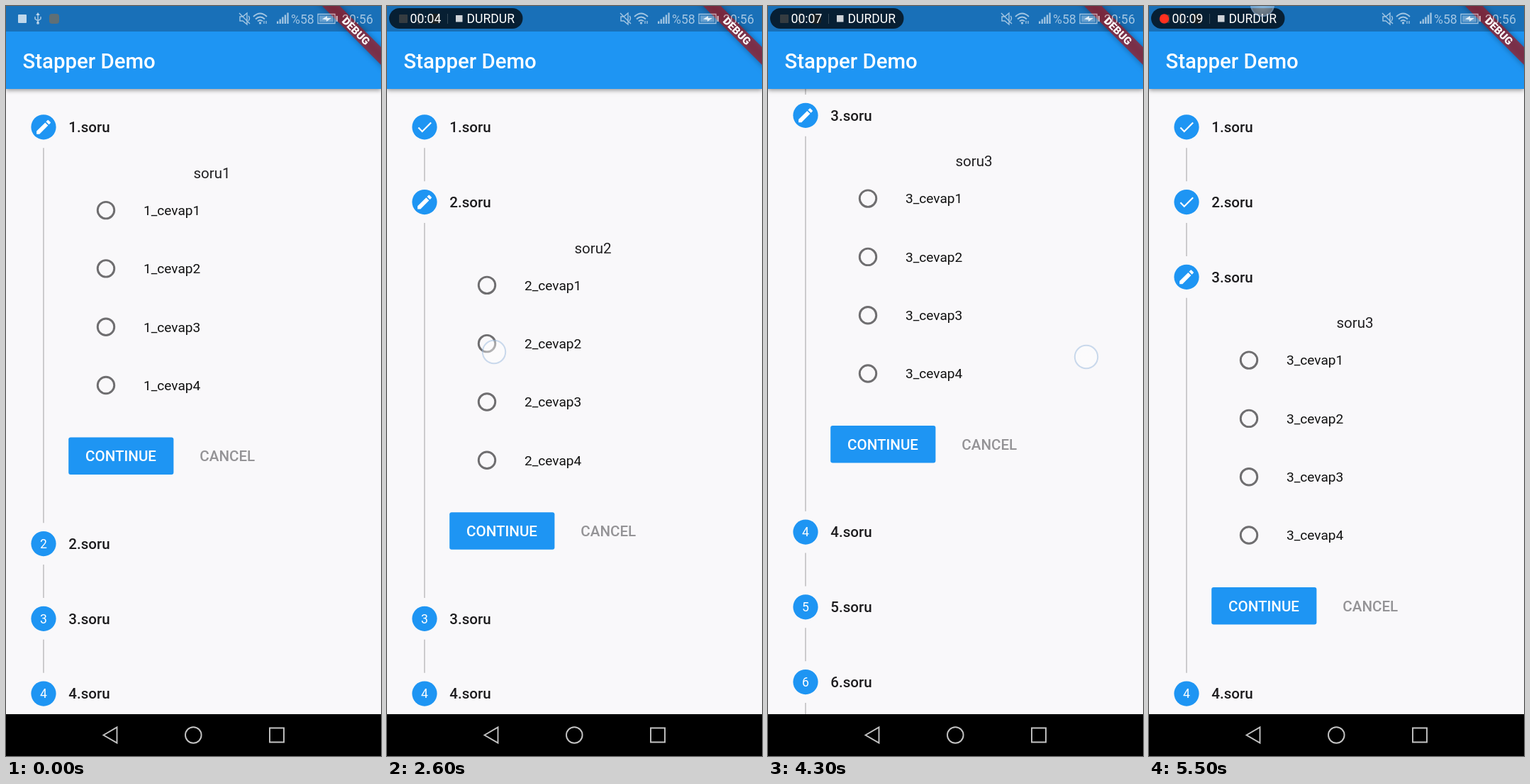
Write an HTML page with a canvas that moves like this. It is 529 px wide and 1058 px high and loops after 5600 ms.

```html
<!DOCTYPE html>
<html lang="tr">
<head>
<meta charset="utf-8">
<title>Stapper Demo</title>
<style>
  html, body { margin: 0; width: 100%; height: 100%; overflow: hidden; background: #f9f8fa; }
  canvas { display: block; width: 529px; height: 1058px; }
</style>
</head>
<body>
<canvas id="stage" width="529" height="1058"></canvas>
<script>
const ctx = document.getElementById('stage').getContext('2d');
const WIDTH = 529, HEIGHT = 1058, LOOP = 5600, TICK = 100;
const BLUE = '#1e95f3', PAPER = '#f9f8fa', STATUS = 'rgba(255,255,255,.6)';
const BAR_BOTTOM = 117, NAV_TOP = 999;
const FIRST_STEP = 170.8, STEP_GAP = 105.75, PANEL = 482, STEP_COUNT = 8;

const CHECK = new Path2D('M9 16.17L4.83 12l-1.42 1.41L9 19 21 7l-1.41-1.41z');
const PENCIL = new Path2D('M3 17.25V21h3.75L17.81 9.94l-3.75-3.75zM20.71 7.04a1 1 0 0 0 0-1.41' +
  'l-2.34-2.34a1 1 0 0 0-1.41 0l-1.83 1.83 3.75 3.75z');

// Each touch is a path of [time, x, y] points, visible from the first time to the last.
const TOUCHES = [
  [[600, 150, 296], [800, 150, 296]],
  [[1500, 185, 628], [1700, 185, 628]],
  [[2500, 151, 488], [2700, 151, 488]],
  [[2900, 185, 735], [3000, 185, 735]],
  [[3900, 420, 730], [4000, 423, 706], [4100, 428, 658], [4200, 437, 585], [4300, 449, 495],
   [4400, 457, 440], [4500, 457, 436], [4600, 463, 480], [4700, 476, 580], [4800, 490, 670],
   [4900, 499, 725]],
  [[5500, 160, -2], [5600, 160, -2]]
];
const SCROLL = [[3900, 0], [4000, 12], [4100, 52], [4200, 128], [4300, 228], [4400, 290],
  [4500, 294], [4600, 250], [4700, 150], [4800, 60], [4900, 10], [5000, 0]];
const OPENINGS = [1700, 3000];   // when the next step starts to open
const SELECTIONS = [{ step: 0, option: 0, at: 800 }, { step: 1, option: 1, at: 2700 }];

const clamp = v => Math.max(0, Math.min(1, v));

function follow(points, t) {
  if (t <= points[0][0]) return points[0].slice(1);
  const next = points.findIndex(p => p[0] > t);
  if (next < 0) return points[points.length - 1].slice(1);
  const a = points[next - 1], b = points[next], k = (t - a[0]) / (b[0] - a[0]);
  return a.slice(1).map((v, i) => v + (b[i + 1] - v) * k);
}

function rect(x, y, w, h, color, radius = 0) {
  ctx.fillStyle = color;
  ctx.beginPath();
  ctx.roundRect(x, y, w, h, radius);
  ctx.fill();
}

function disc(x, y, r, color) {
  ctx.fillStyle = color;
  ctx.beginPath();
  ctx.arc(x, y, r, 0, Math.PI * 2);
  ctx.fill();
}

function ring(x, y, r, color, width) {
  ctx.strokeStyle = color;
  ctx.lineWidth = width;
  ctx.beginPath();
  ctx.arc(x, y, r, 0, Math.PI * 2);
  ctx.stroke();
}

function outline(d, color, width) {
  ctx.strokeStyle = color;
  ctx.lineWidth = width;
  ctx.stroke(new Path2D(d));
}

function label(text, x, baseline, size, color, weight = 400, align = 'left') {
  ctx.font = `${weight} ${size}px Roboto, sans-serif`;
  ctx.textAlign = align;
  ctx.fillStyle = color;
  ctx.fillText(text, x, baseline);
}

function icon(path, x, y) {
  ctx.save();
  ctx.translate(x, y);
  ctx.scale(1.1, 1.1);
  ctx.translate(-12, -12);
  ctx.fillStyle = '#fff';
  ctx.fill(path);
  ctx.restore();
}

function drawPanel(step, y, open, t) {
  ctx.save();
  ctx.beginPath();
  ctx.rect(80, y + 29, WIDTH, 24 + PANEL * open);
  ctx.clip();
  ctx.globalAlpha = open;
  label(`soru${step + 1}`, 290.5, y + 72, 20.57, '#232224', 400, 'center');
  for (let option = 0; option < 4; option++) {
    const cy = y + 117.3 + option * 82.3;
    const chosen = SELECTIONS.some(s => s.step === step && s.option === option && t >= s.at);
    ring(141, cy, 11.75, chosen ? '#000' : '#6f6e70', 2.94);
    if (chosen) disc(141, cy, 6.6, '#000');
    label(`${step + 1}_cevap${option + 1}`, 194, cy + 6.8, 19.1, '#111');
  }
  rect(88.2, y + 437.7, 148.2, 52.6, BLUE, 3);
  label('CONTINUE', 162, y + 471.4, 20.57, '#fff', 500, 'center');
  label('CANCEL', 312.3, y + 471.4, 20.57, '#949396', 500, 'center');
  ctx.restore();
}

function drawStepper(t) {
  const phases = OPENINGS.map(start => clamp((t - start) / 200));
  const openness = [1 - phases[0], phases[0] - phases[1], phases[1]];
  const active = OPENINGS.filter(start => t > start).length;

  ctx.save();
  ctx.beginPath();
  ctx.rect(0, BAR_BOTTOM, WIDTH, NAV_TOP - BAR_BOTTOM);
  ctx.clip();
  let y = FIRST_STEP - follow(SCROLL, t)[0];
  for (let step = 0; step < STEP_COUNT; step++) {
    const open = openness[step] || 0;
    const next = y + STEP_GAP + PANEL * open;
    if (step < STEP_COUNT - 1) rect(52.2, y + 29.4, 1.5, next - y - 58.8, '#bdbcbe');
    disc(53, y, 17.6, BLUE);
    if (step < active) icon(CHECK, 53, y);
    else if (step === active) icon(PENCIL, 53, y);
    else label(step + 1, 53, y + 6.2, 17.6, '#fff', 400, 'center');
    label(`${step + 1}.soru`, 88.2, y + 7.2, 20.57, '#1d1c1e', 500);
    if (open > 0) drawPanel(step, y, open, t);
    y = next;
  }
  ctx.restore();
}

function drawAppBar() {
  ctx.save();
  ctx.shadowColor = 'rgba(0,0,0,.4)';
  ctx.shadowBlur = 6;
  ctx.shadowOffsetY = 2;
  rect(0, 0, WIDTH, BAR_BOTTOM, BLUE);
  ctx.restore();
  rect(0, 0, WIDTH, 36, '#1970b8');
  label('Stapper Demo', 23.5, 88, 29.4, '#fff', 500);
}

function drawDebugBanner() {
  ctx.save();
  ctx.translate(WIDTH, 0);
  ctx.rotate(Math.PI / 4);
  ctx.shadowColor = 'rgba(0,0,0,.5)';
  ctx.shadowBlur = 8;
  rect(-70, 41.1, 140, 17.6, 'rgba(160,28,40,.72)');
  ctx.shadowColor = 'transparent';
  label('DEBUG', 0, 55.2, 15, '#fff', 900, 'center');
  ctx.restore();
}

function drawStatusIcons() {
  rect(17, 12, 12, 12, 'rgba(255,255,255,.72)', 1);
  outline('M45 11V24M41 15V18L45 21L49 18V15', STATUS, 1.5);
  ctx.fillStyle = STATUS;
  ctx.fill(new Path2D('M45 9l3 4h-6z'));
  disc(45, 24, 2, STATUS);
  rect(61, 11, 14, 14, '#5f6f76', 4);

  outline('M330 15H334L340 10V26L334 21H330ZM329 10L344 25M342 14Q345 17 342 21', STATUS, 1.4);
  outline('M349 15Q358.500 6 368 15M352 18.500Q358.500 12.500 365 18.500M355 21.500Q358.500 18.500 362 21.500',
    STATUS, 1.9);
  disc(358.5, 24, 1.7, STATUS);
  outline('M364 21V25M367 21V25', STATUS, 1.3);
  for (let i = 0; i < 5; i++) rect(382 + i * 3.6, 21.5 - i * 3, 2.3, 3.5 + i * 3, STATUS);
  label('%58', 402, 24.5, 17.6, STATUS);
  outline('M440 11.500H464V24.500H440Z', STATUS, 1.3);
  rect(442, 13.5, 20, 9, 'rgba(255,255,255,.35)');
  rect(465.5, 14, 2.5, 8, STATUS);
  ctx.fillStyle = '#e0edf7';
  ctx.fill(new Path2D('M446 18.500L453 14V17H459L452 22V19.500Z'));
  label('20:56', 474, 24.5, 17.6, STATUS);
}

function drawRecorder(t) {
  const seconds = t * 1.75 / 1000;
  rect(3, 3, 188.5, 29, 'rgba(0,0,0,.72)', 14.5);
  if (seconds % 1 > .57) disc(21.5, 18, 6.7, '#ff301f');
  label(`00:0${Math.floor(seconds)}`, 32.5, 24.3, 17.6, '#fff');
  rect(85, 11, 1, 14, 'rgba(255,255,255,.18)');
  rect(97, 13, 9.5, 9.5, '#cfd3d8');
  label('DURDUR', 112.5, 24.3, 17.6, '#fff');
}

function drawNavigation() {
  rect(0, NAV_TOP, WIDTH, HEIGHT - NAV_TOP, '#000');
  outline('M137.500 1028.500L156.500 1017.500V1039.500Z', '#c4c4c4', 1.9);
  ring(264.3, 1028.5, 11.3, '#c4c4c4', 1.9);
  outline('M372 1018.500H392V1038.500H372Z', '#c4c4c4', 1.9);
}

function drawTouch(points, t) {
  if (t < points[0][0] || t > points[points.length - 1][0]) return;
  const [x, y] = follow(points, t);
  const glow = ctx.createRadialGradient(x, y, 0, x, y, 17);
  glow.addColorStop(0, 'rgba(255,255,255,.5)');
  glow.addColorStop(1, 'rgba(255,255,255,.35)');
  disc(x, y, 17, glow);
  ring(x, y, 16.2, 'rgba(125,165,210,.4)', 2);
}

function draw(t) {
  rect(0, 0, WIDTH, HEIGHT, PAPER);
  drawStepper(t);
  drawAppBar();
  drawDebugBanner();
  drawStatusIcons();
  if (t >= 100) drawRecorder(t);
  drawNavigation();
  TOUCHES.forEach(points => drawTouch(points, t));
}

const start = performance.now();
function frame() {
  const elapsed = (performance.now() - start) % LOOP;
  draw(Math.floor(elapsed / TICK) * TICK);
  requestAnimationFrame(frame);
}
frame();
</script>
</body>
</html>
```
